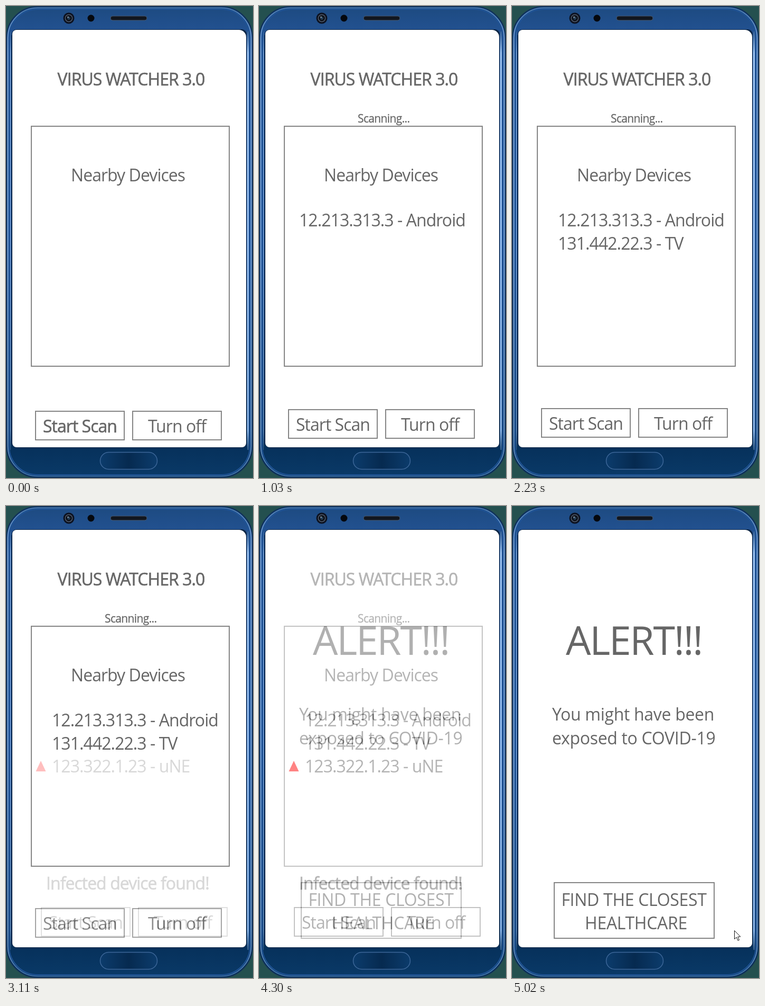
An HTML page with a canvas that plays this animation: 468 px wide and 891 px high, repeating every 5.11 s.

```html
<!DOCTYPE html>
<html lang="en">
<head>
<meta charset="utf-8">
<title>Scanner app</title>
<style>
  html, body { margin: 0; width: 100%; height: 100%; overflow: hidden; background: #24504f; }
  canvas { display: block; width: 468px; height: 891px; }
</style>
</head>
<body>
<canvas id="stage" width="468" height="891"></canvas>
<script>
const W = 468, H = 891, LOOP = 5110, STEP = 80, FADE = 300;
const INK = '#666', LINE = '#858585';
const stage = document.getElementById('stage').getContext('2d');
let ctx = stage;

// Each dissolve is sampled every STEP ms; lead is the time already elapsed at its first sample.
const fades = [
  { at: 710, lead: 42 },
  { at: 1910, lead: 42 },
  { at: 3110, lead: 42 },
  { at: 4300, lead: 95 }
];

// Pointer positions: from, until, x, y
const pointer = [
  [160, 320, 262, 798],
  [320, 710, 140, 789],
  [5020, LOOP, 421, 801]
];

const scans = [
  { buttons: [55, 764], boldStart: true },
  { buttons: [55, 761], scanning: true, listX: 76, found: 1 },
  { buttons: [55, 759], scanning: true, listX: 87, found: 2 },
  { buttons: [66, 757], scanning: true, listX: 87, found: 3, infected: true }
];
const devices = ['12.213.313.3 - Android', '131.442.22.3 - TV', '123.322.1.23 - uNE'];

function text(str, x, y, { size = 32, align = 'left', heavy = 0, track = -0.03 } = {}) {
  ctx.font = `${size}px "Open Sans", "Noto Sans", sans-serif`;
  ctx.letterSpacing = `${track * size}px`;
  ctx.textAlign = align;
  ctx.fillStyle = INK;
  ctx.fillText(str, x, y);
  if (heavy) {
    ctx.strokeStyle = INK;
    ctx.lineWidth = heavy;
    ctx.strokeText(str, x, y);
  }
}

function frame(x, y, w, h) {
  ctx.strokeStyle = LINE;
  ctx.lineWidth = 2;
  ctx.strokeRect(x + 1, y + 1, w - 1, h - 1);
}

function rounded(x, y, w, h, r) {
  ctx.beginPath();
  ctx.roundRect(x, y, w, h, r);
}

function fillRound(x, y, w, h, r, fill) {
  rounded(x, y, w, h, r);
  ctx.fillStyle = fill;
  ctx.fill();
}

function strokeRound(inset, color, width) {
  rounded(inset, inset, W - 2 * inset, H - 2 * inset, 60 - inset);
  ctx.strokeStyle = color;
  ctx.lineWidth = width;
  ctx.stroke();
}

function disc(x, y, r, color) {
  ctx.beginPath();
  ctx.arc(x, y, r, 0, Math.PI * 2);
  ctx.fillStyle = color;
  ctx.fill();
}

function gradient(x1, y1, x2, y2, stops) {
  const g = ctx.createLinearGradient(x1, y1, x2, y2);
  stops.forEach(([pos, color]) => g.addColorStop(pos, color));
  return g;
}

function drawPhone() {
  ctx.fillStyle = '#24504f';
  ctx.fillRect(0, 0, W, H);
  fillRound(1, 1, W - 2, H - 2, 59, gradient(0, 0, 0, H, [
    [0, '#1d4a80'], [0.05, '#225190'], [0.5, '#1f4f92'], [0.93, '#06305a'], [1, '#0a3a68']
  ]));
  strokeRound(1, '#103058', 2);
  strokeRound(3.5, gradient(0, 0, 0, H, [
    [0, '#4f7fb4'], [0.1, '#9cc4f2'], [0.9, '#92bdf0'], [1, '#4577ae']
  ]), 1.5);
  strokeRound(6, '#1f5396', 2);

  const rim = gradient(0, 40, 0, 850, [
    [0, '#1d4a80'], [0.06, '#a2c8f4'], [0.94, '#92bcf0'], [1, '#0a3560']
  ]);
  ctx.fillStyle = rim;
  ctx.fillRect(457, 48, 3, 790);
  ctx.fillRect(8, 48, 1, 790);
  ctx.fillStyle = '#0d2c54';
  ctx.fillRect(10, 55, 2, 772);
  fillRound(11, 44, 445, 790, 9, '#0d2646');

  disc(119, 23, 10.5, '#0c1220');
  disc(119, 23, 7.5, '#4b5565');
  disc(119, 23, 5.8, '#0a0e16');
  disc(119, 23, 3, '#263e55');
  disc(117.5, 21, 1.2, '#a4b5c5');
  disc(161, 23, 6.5, '#05080e');
  fillRound(198, 19, 69, 8, 4, '#11161f');
  ctx.strokeStyle = '#46566c';
  ctx.lineWidth = 1;
  ctx.stroke();

  fillRound(178.5, 842.5, 108, 32, 16, gradient(178, 0, 287, 0, [
    [0, '#0c3c6c'], [0.5, '#062a50'], [1, '#0c3c6c']
  ]));
  ctx.strokeStyle = '#3c6698';
  ctx.lineWidth = 1.5;
  ctx.stroke();
}

function drawButton(label, x, y, heavy) {
  frame(x, y, 169, 55);
  text(label, x + 85, y + 41, { align: 'center', heavy });
}

function drawScan(s) {
  text('VIRUS WATCHER 3.0', 237, 150, { align: 'center', heavy: 0.6 });
  if (s.scanning) text('Scanning...', 187, 220, { size: 21, heavy: 0.3 });
  frame(47, 226, 376, 454);
  text('Nearby Devices', 123, 331);
  devices.slice(0, s.found || 0).forEach((d, i) => text(d, s.listX, 416 + i * 43.5));
  if (s.infected) {
    ctx.fillStyle = '#ff0000';
    ctx.beginPath();
    ctx.moveTo(66, 481);
    ctx.lineTo(75.5, 501);
    ctx.lineTo(56.5, 501);
    ctx.fill();
    text('Infected device found!', 76, 724, { heavy: 0.6 });
  }
  const [x, y] = s.buttons;
  drawButton('Start Scan', x, y, s.boldStart ? 0.6 : 0);
  drawButton('Turn off', x + 184, y, 0);
}

function drawAlert() {
  const track = -0.01;
  text('ALERT!!!', 102, 281, { size: 75 });
  text('You might have been', 76, 405, { track });
  text('exposed to COVID-19', 76, 450, { track });
  frame(79, 710, 304, 106);
  text('FIND THE CLOSEST', 231, 755, { align: 'center', track });
  text('HEALTHCARE', 235, 799, { align: 'center', track });
}

// Screens are flattened first so that a dissolve leaves shared parts untouched.
function makeLayer(draw) {
  const canvas = document.createElement('canvas');
  canvas.width = W;
  canvas.height = H;
  ctx = canvas.getContext('2d');
  fillRound(12, 45, 443, 788, [8, 14, 8, 8], '#fff');
  draw();
  ctx = stage;
  return canvas;
}

const layers = [...scans.map(s => () => drawScan(s)), drawAlert].map(makeLayer);

function drawScreen(index, alpha) {
  ctx.globalAlpha = alpha;
  ctx.drawImage(layers[index], 0, 0);
  ctx.globalAlpha = 1;
}

function drawPointer(x, y) {
  const shape = [[0, 0], [0, 16], [3.8, 12.6], [6.6, 18.8], [9, 17.7], [6.3, 11.7], [11.3, 11.5]];
  ctx.beginPath();
  shape.forEach(([dx, dy]) => ctx.lineTo(x + 0.5 + dx, y + 0.5 + dy));
  ctx.closePath();
  ctx.fillStyle = '#fff';
  ctx.fill();
  ctx.strokeStyle = '#111';
  ctx.lineWidth = 1;
  ctx.stroke();
}

function fadeAmount(fade, t) {
  const k = Math.floor((t - fade.at) / STEP);
  const u = Math.min(1, (fade.lead + k * STEP) / FADE);
  return 1 - Math.pow(1 - u, 1.9);
}

function render(t) {
  drawPhone();
  const current = fades.filter(f => t >= f.at).length;
  const alpha = current ? fadeAmount(fades[current - 1], t) : 1;
  if (alpha < 1) drawScreen(current - 1, 1);
  drawScreen(current, alpha);
  const spot = pointer.find(([from, until]) => t >= from && t < until);
  if (spot) drawPointer(spot[2], spot[3]);
}

const start = performance.now();
function tick() {
  render((performance.now() - start) % LOOP);
  requestAnimationFrame(tick);
}
tick();
</script>
</body>
</html>
```
